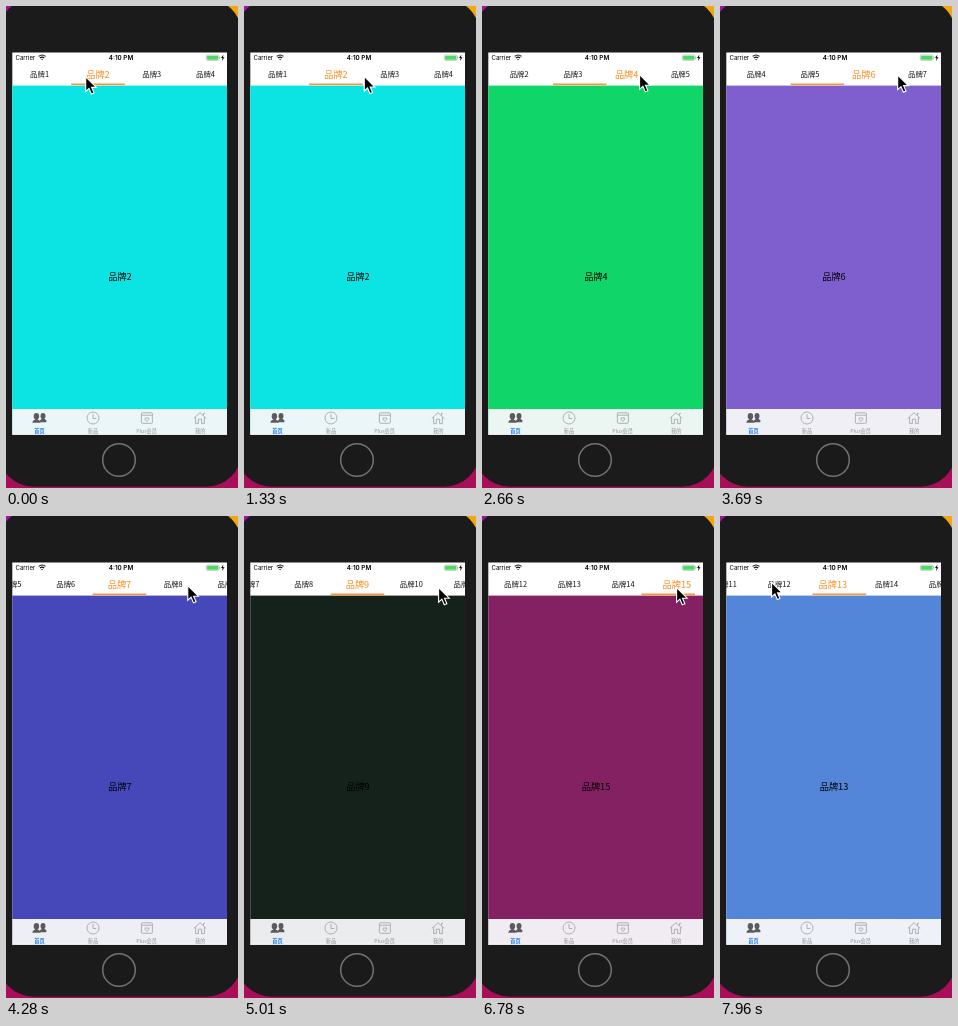
An HTML page that plays this animation: 232x482 px, repeating every 8000 ms.

```html
<!DOCTYPE html>
<html>
<head>
<meta charset="utf-8">
<style>
html, body { margin: 0; width: 100%; height: 100%; overflow: hidden; background: #a80f58; }
svg { display: block; width: 232px; height: 482px; }
text { font-family: "Noto Sans CJK SC", "Noto Sans CJK", sans-serif; text-anchor: middle; }
.status text { font: 6px Inter, sans-serif; text-anchor: start; }
.bar text { font-size: 5.2px; fill: #929297; }
.line { fill: none; stroke: #a9a9ad; stroke-width: .9; }
</style>
</head>
<body>
<svg viewBox="0 0 232 482">
  <clipPath id="screen"><rect x="6.3" y="46.5" width="214.7" height="382.3"/></clipPath>

  <rect width="116" height="241" fill="#a0149c"/>
  <rect x="116" width="116" height="241" fill="#f3a70f"/>
  <rect x="-8" y="-7.5" width="244" height="488.2" rx="36" fill="#1b1b1c"/>
  <circle cx="113" cy="454" r="16.3" fill="#1a1a1b" stroke="#737375" stroke-width="1.5"/>

  <g clip-path="url(#screen)">
    <rect x="6" y="46" width="216" height="384" fill="#fff"/>
    <rect id="page" x="6" y="79.6" width="216" height="348"/>
    <text id="label" x="114" y="274.2" font-size="9.2"/>

    <g class="status">
      <text x="9.5" y="54">Carrier</text>
      <text x="115" y="54" style="font-size:6.3px;font-weight:600;text-anchor:middle">4:10 PM</text>
      <g fill="none" stroke="#111" stroke-width="1.1">
        <path d="M32.7 50.4Q36.1 47.5 39.5 50.4M34 52Q36.1 50.2 38.2 52"/>
        <path d="M35.1 53.1L36.1 54.2L37.1 53.1Z" fill="#111" stroke="none"/>
      </g>
      <rect x="200.4" y="49" width="12.6" height="5.4" rx="1.3" fill="#fff" stroke="#999" stroke-width=".5"/>
      <rect x="201.1" y="49.7" width="11.2" height="4" rx=".7" fill="#4cd964"/>
      <path d="M213.7 50.8V52.7" stroke="#999" stroke-width=".7"/>
      <path d="M217.4 48.6L215.1 52.1H216.6L216 54.9L218.5 51.2H216.9Z"/>
    </g>

    <g id="strip"><rect id="underline" y="77.5" width="53.7" height="1.6" fill="#ff9430"/></g>

    <g class="bar">
      <rect x="6" y="403" width="216" height="27" fill="#f7f7f9" fill-opacity=".95"/>
      <g fill="#5b5b5e">
        <ellipse cx="37" cy="410" rx="2.5" ry="3.1"/>
        <path d="M34 416.3V414.6L36 412.5H38L40.4 414.3V416.3Z"/>
        <ellipse cx="30.4" cy="410.2" rx="2.7" ry="3.3"/>
        <path d="M26.3 416.8Q26.3 414.3 29.2 413.4V412H31.7V413.4Q34.6 414.3 34.6 416.8Z"/>
      </g>
      <g class="line">
        <circle cx="87" cy="412" r="6"/>
        <path d="M87 408V412.5H90.3"/>
        <rect x="135.4" y="406.8" width="11" height="10.5" rx="1"/>
        <path d="M135.4 409.2H146.4M140.9 415.4L138.8 413.2Q139 411 140.9 412.2Q142.8 411 143 413.2Z"/>
        <path d="M187.8 412.4L194 406.7L200.2 412.4M189.6 411.2V417.6H192.4V413.2H195.6V417.6H198.4V411.2M197.5 409.6V407.4H199"/>
      </g>
      <text x="33.4" y="427" style="fill:#1d7ff2;font-weight:700">首页</text>
      <text x="87" y="427">新品</text>
      <text x="140.6" y="427">Plus会员</text>
      <text x="194.2" y="427">我的</text>
    </g>
  </g>

  <path id="cursor" d="M0 0V14.6L3.3 11.6L5.7 17.2L8.3 16.1L5.9 10.6H10.6Z"
        stroke="#fff" stroke-width="1.1"/>
</svg>

<script>
const LOOP = 8000, COUNT = 15, CELL = 53.75, MIDDLE = 113.5;

const $ = id => document.getElementById(id);
const clamp = (v, lo, hi) => Math.min(hi, Math.max(lo, v));
const mix = (a, b, p) => a + (b - a) * p;
const smooth = p => p * p * (3 - 2 * p);
const easeOut = p => 1 - (1 - p) ** 2;

// The first tab sits a little apart from the evenly spaced rest.
const tabX = n => CELL * n - (n > 1 ? 15.5 : 20.2);
const maxScroll = tabX(COUNT - 3) - tabX(1);
const scrollFor = n => clamp(tabX(n) - MIDDLE, 0, maxScroll);

const accents = { 2: '#0ce4e4', 3: '#4a3f9f', 4: '#10d569', 6: '#7e5fcd', 9: '#15211b', 13: '#5386d8', 15: '#832162' };
const pageColor = n => accents[n] || `hsl(${n * 137 % 360} 45% 50%)`;

// Tabs are tapped one by one, evenly between these moments.
const rhythm = [{ at: -999, tab: 2 }, { at: 1760, tab: 3 }, { at: 2585, tab: 4 }, { at: 3613, tab: 6 },
  { at: 4690, tab: 9 }, { at: 5110, tab: 10 }, { at: 6552, tab: 15 }, { at: 7400, tab: 14 }, { at: 7720, tab: 13 }];
const taps = rhythm.flatMap((key, i) => {
  const last = rhythm[i - 1];
  if (!last) return [key];
  const count = Math.abs(key.tab - last.tab);
  return Array.from({ length: count }, (_, k) => {
    const p = (k + 1) / count;
    return { at: mix(last.at, key.at, p), tab: Math.round(mix(last.tab, key.tab, p)) };
  });
});

// Each stop is reached by a glide that takes longer the farther it goes.
const stops = [{ at: 0, x: 79.7, y: 70.8 }, { at: 590, x: 119.5, y: 70.5 }, { at: 1640, x: 140.5, y: 67.6 },
  { at: 2520, x: 157.6, y: 68.7 }, { at: 3550, x: 177.7, y: 69 }, { at: 4500, x: 194.6, y: 71.6 },
  { at: 7950, x: 51.6, y: 66.3 }];

function cursorAt(t) {
  return stops.slice(1).reduce(([x, y], stop) => {
    const duration = 250 + 5 * Math.abs(stop.x - x);
    const p = smooth(clamp(1 + (t - stop.at) / duration, 0, 1));
    return p ? [mix(x, stop.x, p), mix(y, stop.y, p)] : [x, y];
  }, [stops[0].x, stops[0].y]);
}

const tabs = Array.from({ length: COUNT }, (_, i) => {
  const tab = document.createElementNS('http://www.w3.org/2000/svg', 'text');
  tab.textContent = '品牌' + (i + 1);
  tab.setAttribute('x', tabX(i + 1));
  return $('strip').appendChild(tab);
});

function draw(t) {
  const i = taps.findLastIndex(tap => tap.at <= t);
  const now = taps[i].tab, before = taps[Math.max(0, i - 1)].tab;
  const age = t - taps[i].at;
  const scroll = mix(scrollFor(before), scrollFor(now), easeOut(clamp(age / 280, 0, 1)));
  const mark = mix(tabX(before), tabX(now), smooth(clamp(age / 300, 0, 1)));

  $('page').setAttribute('fill', pageColor(now));
  $('label').textContent = '品牌' + now;
  $('strip').setAttribute('transform', `translate(${-scroll})`);
  $('underline').setAttribute('x', mark - CELL / 2);
  tabs.forEach((tab, n) => {
    const on = n + 1 === now;
    tab.setAttribute('font-size', on ? 9.2 : 7.4);
    tab.setAttribute('y', on ? 71.7 : 71);
    tab.setAttribute('fill', on ? '#ff8c1f' : '#111');
  });
  $('cursor').setAttribute('transform', `translate(${cursorAt(t)})`);
}

// The picture advances in steps of about 147 ms.
const STEP = 147.3, OFFSET = 295;
const stepped = t => OFFSET + STEP * Math.floor((t - OFFSET) / STEP);

const begin = performance.now();
function tick() {
  draw(stepped((performance.now() - begin) % LOOP));
  requestAnimationFrame(tick);
}
tick();
</script>
</body>
</html>
```
